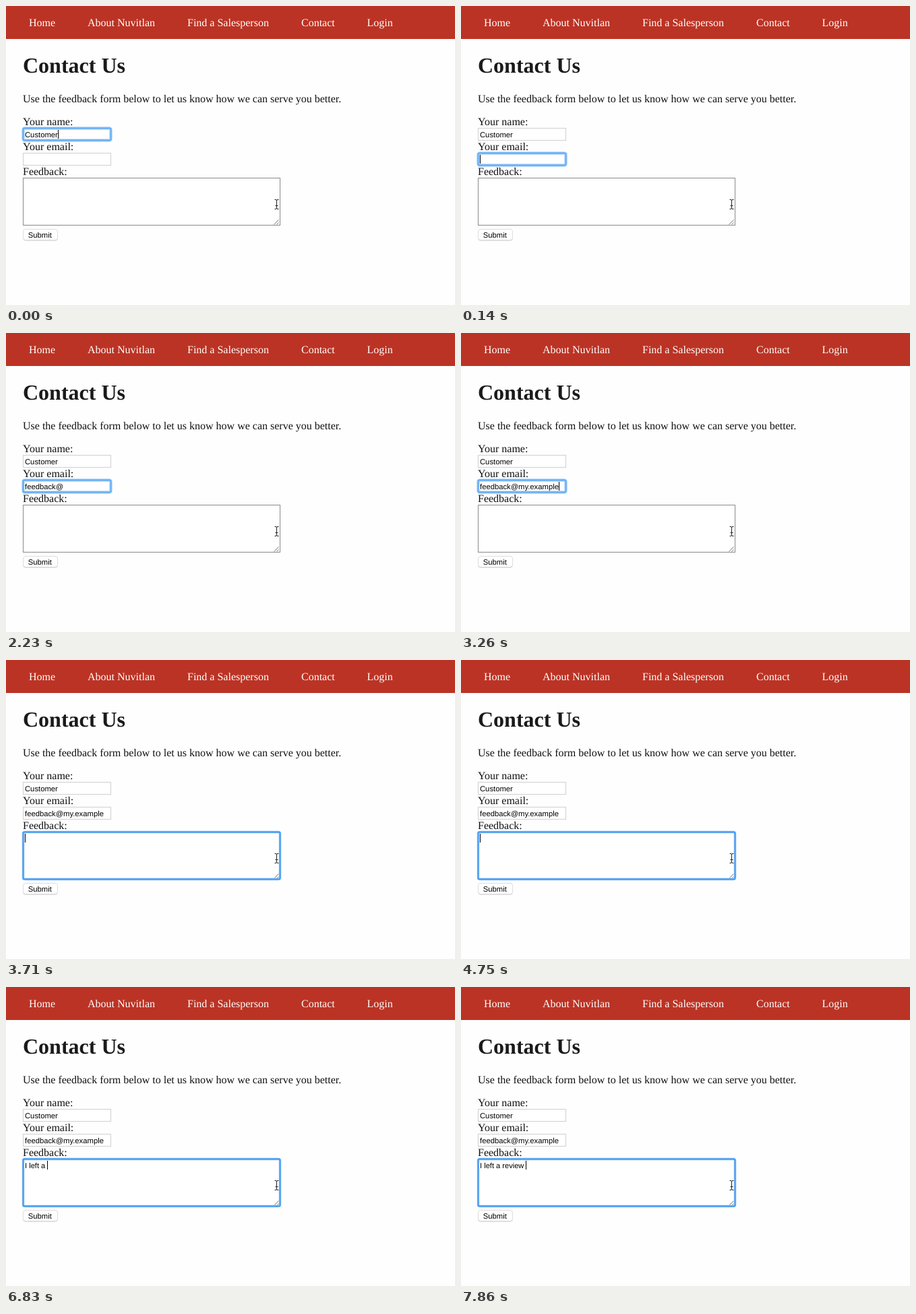
Animation of 666 by 444 pixels, one loop 8000 ms. Source, as an HTML page:

```html
<!DOCTYPE html>
<html lang="en">
<head>
<meta charset="utf-8">
<title>Contact form</title>
<style>
  html, body { margin: 0; width: 100%; height: 100%; overflow: hidden; background: #fefefe; }
  svg { display: block; width: 666px; height: 444px; }
  text { font: 16px "Liberation Serif", "Times New Roman", serif; fill: #111; white-space: pre; text-rendering: geometricPrecision; }
  .nav text { fill: #fff; }
  .title { font-size: 32px; font-weight: bold; fill: #1a1a1a; }
  .ui { font: 11.25px "Liberation Sans", Arial, sans-serif; fill: #000; }
  #feedback { font-size: 11.1px; }
  .box { fill: #fff; stroke: #d0d0d0; }
  .area { stroke: #8a8a8a; }
  .ring rect { fill: none; }
</style>
</head>
<body>
<svg viewBox="0 0 666 444">
  <rect width="666" height="444" fill="#fefefe"/>
  <rect width="666" height="49" fill="#bb3324"/>
  <g class="nav">
    <text x="34" y="30">Home</text>
    <text x="121" y="30">About Nuvitlan</text>
    <text x="269" y="30">Find a Salesperson</text>
    <text x="438" y="30">Contact</text>
    <text x="535.5" y="30">Login</text>
  </g>
  <text class="title" x="25" y="99">Contact Us</text>
  <text x="25" y="143">Use the feedback form below to let us know how we can serve you better.</text>
  <text x="25" y="177">Your name:</text>
  <text x="25" y="214">Your email:</text>
  <text x="25" y="251">Feedback:</text>

  <rect class="box" x="25.5" y="181.5" width="130" height="18"/>
  <rect class="box" x="25.5" y="218.5" width="130" height="18"/>
  <rect class="box area" x="25.5" y="255.5" width="381" height="70"/>
  <path d="M397.5 324.5l7-7M401.5 324.5l3-3" stroke="#777" fill="none"/>

  <g class="ring">
    <rect id="glow" rx="3" stroke="#c3defb" stroke-width="5"/>
    <rect id="ring" rx="1.5" stroke="#68aef6" stroke-width="2.4"/>
  </g>
  <text class="ui" id="name" x="28" y="195"></text>
  <text class="ui" id="email" x="28" y="232"></text>
  <text class="ui" id="feedback" x="28" y="269"></text>
  <rect id="caret" width="1" height="13"/>

  <rect x="25.5" y="332" width="51" height="16.5" rx="3.5" fill="#c4c4c4"/>
  <rect x="25.5" y="331.5" width="51" height="16" rx="3.5" fill="#fff" stroke="#dedede"/>
  <text class="ui" x="32.8" y="344">Submit</text>

  <g fill="none">
    <path id="beam" d="M398.5 287.5h1.5q1.5 0 1.5 1.5q0-1.5 1.5-1.5h1.5M401.5 289v11M398.5 301.5h1.5q1.5 0 1.5-1.5q0 1.5 1.5 1.5h1.5M399.5 296.5h4" stroke="#222"/>
  </g>
</svg>
<script>
const LOOP = 8000;
const el = id => document.getElementById(id);

const fields = {
  name:     { value: "Customer",            top: 181, width: 130, height: 18 },
  email:    { value: "feedback@my.example", top: 218, width: 130, height: 18 },
  feedback: { value: "I left a review ",    top: 255, width: 381, height: 70 },
};
const order = Object.keys(fields);

// [start ms, focused field, characters typed, caret hidden]
const steps = [
  [0, "name", 8],
  [140, "email", 0], [740, "email", 2], [890, "email", 4], [1040, "email", 6], [1190, "email", 8],
  [1630, "email", 8, true], [1780, "email", 9], [2230, "email", 9, true],
  [2380, "email", 11], [2520, "email", 13], [2670, "email", 15],
  [2960, "email", 16], [3110, "email", 18], [3260, "email", 19],
  [3710, "feedback", 0], [4150, "feedback", 0, true], [4750, "feedback", 0], [5190, "feedback", 0, true],
  [5640, "feedback", 2], [5790, "feedback", 4], [5940, "feedback", 5], [6230, "feedback", 7],
  [6680, "feedback", 7, true], [6830, "feedback", 9], [6970, "feedback", 11],
  [7270, "feedback", 12], [7420, "feedback", 14], [7560, "feedback", 15], [7860, "feedback", 16],
];

function setAttributes(node, attributes) {
  for (const key in attributes) node.setAttribute(key, attributes[key]);
}

function show([, focus, typed, hidden]) {
  const active = order.indexOf(focus);
  order.forEach((id, i) => {
    const length = i < active ? Infinity : i === active ? typed : 0;
    el(id).textContent = fields[id].value.slice(0, length);
  });

  const { top, width, height } = fields[focus];
  const frame = { x: 25.5, y: top + 0.5, width, height };
  const isArea = focus === "feedback";
  setAttributes(el("glow"), { ...frame, "stroke-width": isArea ? 4 : 5 });
  setAttributes(el("ring"), { ...frame, stroke: isArea ? "#4a9cf0" : "#68aef6" });

  const textWidth = typed ? el(focus).getComputedTextLength() : 0;
  setAttributes(el("caret"), {
    x: Math.round(28 + textWidth),
    y: top + 3,
    visibility: hidden ? "hidden" : "visible",
  });
}

let current;
const start = performance.now();

function draw(now) {
  const time = Math.max(0, now - start) % LOOP;
  const step = steps.findLast(([begin]) => begin <= time);
  if (step !== current) show(current = step);
  requestAnimationFrame(draw);
}
draw(start);
</script>
</body>
</html>
```
